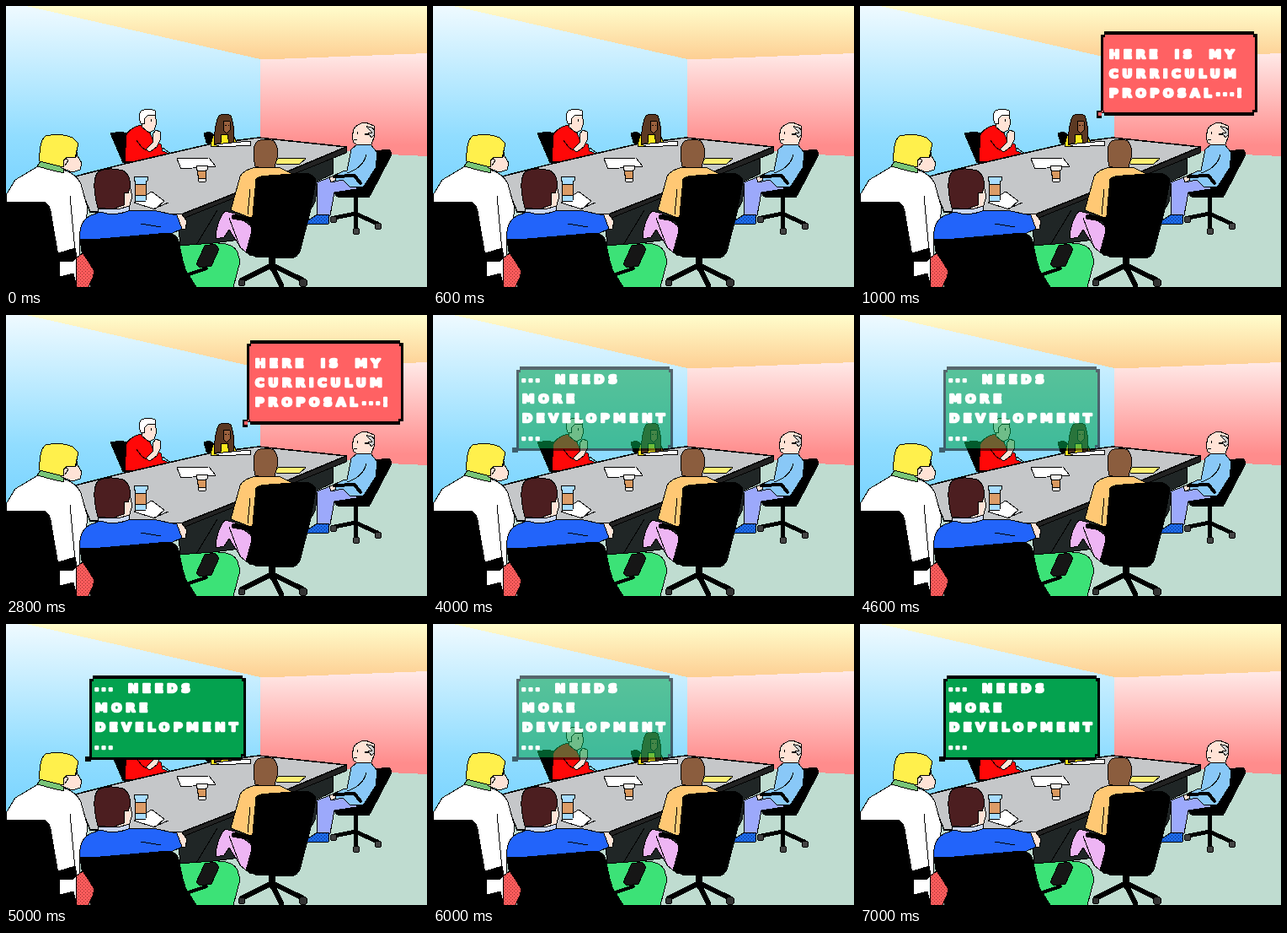
Animation, 500 px wide and 333 px high, one loop 8000 ms. Source, as an HTML page without scripts:

```html
<!DOCTYPE html>
<html lang="en">
<head>
<meta charset="utf-8">
<title>Meeting room</title>
<style>
  html, body { margin: 0; width: 100%; height: 100%; overflow: hidden; background: #bfdcd0; }
  svg { display: block; width: 100vw; height: 100vh; }
  .scene { stroke: #000; stroke-width: 1; stroke-linejoin: round; shape-rendering: crispEdges; }
  .bare { stroke: none; }
  .line { fill: none; }
  .limb { fill: none; stroke-linecap: round; }
  .skin { fill: #ffe3d6; }
  .box { shape-rendering: crispEdges; }
  text {
    font: bold 14.5px "DejaVu Sans", sans-serif;
    letter-spacing: 4.8px; word-spacing: 5.5px;
    fill: #fff; stroke: #fff; stroke-width: 2.6; stroke-linejoin: round;
  }
  .dots { letter-spacing: 2.8px; }
  .pitch { animation: pitch 8s step-end infinite; }
  .reply { animation: reply 8s step-end infinite; }
  .reply .box { animation: pulse 8s step-end infinite; }
  @keyframes pitch { 0%, 50% { visibility: hidden } 12.5% { visibility: visible } }
  @keyframes reply { 0% { visibility: hidden } 50% { visibility: visible } }
  @keyframes pulse { 0%, 50%, 75% { opacity: .57 } 62.5%, 87.5% { opacity: 1 } }
</style>
</head>
<body>
<svg viewBox="0 0 500 333" preserveAspectRatio="none">
  <defs>
    <linearGradient id="sky" gradientUnits="userSpaceOnUse" x1="0" y1="0" x2="0" y2="220">
      <stop stop-color="#effaff"/><stop offset=".7" stop-color="#91ddff"/><stop offset="1" stop-color="#7bd4ff"/>
    </linearGradient>
    <linearGradient id="ceiling" gradientUnits="userSpaceOnUse" x1="0" y1="0" x2="0" y2="64">
      <stop stop-color="#fffdcc"/><stop offset="1" stop-color="#fdce92"/>
    </linearGradient>
    <linearGradient id="rose" gradientUnits="userSpaceOnUse" x1="0" y1="58" x2="0" y2="165">
      <stop stop-color="#ffe8e6"/><stop offset="1" stop-color="#ff8c8c"/>
    </linearGradient>
    <pattern id="redDots" width="4" height="4" patternUnits="userSpaceOnUse">
      <path fill="#ff5c5c" d="M0 0h4v4H0z"/><path fill="#9c3030" d="M0 0h1v1H0zM2 2h1v1H2z"/>
    </pattern>
    <pattern id="blueDots" width="4" height="4" patternUnits="userSpaceOnUse">
      <path fill="#1c6ae8" d="M0 0h4v4H0z"/><path fill="#0a2c80" d="M0 0h1v1H0zM2 2h1v1H2z"/>
    </pattern>
  </defs>

  <g class="scene">
    <!-- Room -->
    <g class="bare">
      <path fill="#bfdcd0" d="M0 0H500V333H0z"/>
      <path fill="url(#sky)" d="M0 0H30L302 62V240H0z"/>
      <path fill="url(#ceiling)" d="M24 0H500V56L318 63 302 63z"/>
      <path fill="url(#rose)" d="M302 63H318L500 56V178L455 176 302 164z"/>
    </g>

    <!-- Man in red -->
    <path d="M124 151L137 149 147 152 150 184 139 186 133 172z"/>
    <path d="M140 184L186 176 185 197 142 196z"/>
    <path fill="#ff0808" d="M141 184L143 153Q146 145 160 141L170 148 175 160 184 164 186 172 199 177 181 180 163 187z"/>
    <path class="skin" d="M161 129H177L179 138 176 147 170 150 162 144z"/>
    <path fill="#fff" d="M160 139Q156 128 161 124 169 120 177 124L178 129 168 130 165 133 164 140z"/>
    <path class="skin" d="M174 152L178 147 183 149 184 157 179 167 171 173 166 170 174 162z"/>
    <path class="line" d="M155 159Q160 167 166 171M172 134v3M186 168L200 178"/>

    <!-- Table -->
    <path fill="#202626" d="M204 250L388 178V199L371 207 367 232 356 252 270 278 207 286z"/>
    <path fill="#222" d="M404 167V174L210 252 206 246z"/>
    <path fill="#c5c7c9" stroke-width="1.6" d="M82 202L141 187 245 163 300 156 404 167 262 226 208 247 100 244z"/>
    <path class="line" d="M388 183V199M251 242L226 283"/>

    <!-- Woman in yellow -->
    <path d="M235 151L242 149 248 154 247 164 238 162z"/>
    <path fill="#ffe81e" d="M243 164L246 154 258 149 270 153 274 162 264 166 244 167z"/>
    <path fill="#5c3922" d="M247 158Q249 136 253 130 260 126 267 130 271 139 271 161L265 163 263 152 256 152 255 162 248 164z"/>
    <path fill="#99603d" d="M259 136L266 137 266 147 262 151 258 147z"/>
    <path class="line" d="M260 141h2M264 141h1"/>

    <!-- Things on the table -->
    <g fill="#fff">
      <path d="M247 164L290 160 291 165 256 167z"/>
      <path d="M203 181L241 180 249 190 208 193z"/>
      <path d="M152 233L173 220 188 231 177 241z"/>
    </g>
    <path fill="#ffef72" d="M320 183L325 180 356 181 349 187 321 187z"/>
    <path class="line" d="M174 241L193 233"/>
    <path fill="#f6f2ec" d="M226 189H239V194H238L237 208H229L227 194H226z"/>
    <path fill="#d9985e" d="M227 195H238L237 204H229z"/>
    <path fill="#a8dcff" d="M152 202H168V207H167L166 231H154L153 207H152z"/>
    <path fill="#dc9c68" d="M153 211H167L166 224H154z"/>

    <!-- Man in light blue -->
    <path d="M440 172L453 170Q459 171 457 178L435 220 431 227 393 226 387 217 422 211z"/>
    <path fill="#9ca9fb" d="M369 209L385 203 421 210 416 217 390 221 385 248 370 248z"/>
    <path fill="url(#blueDots)" d="M356 256L368 248 384 247 383 258 357 259z"/>
    <path fill="#89c8f7" d="M405 195L410 170 417 164 433 164 441 174 439 192 424 215 408 214 400 206 386 209 385 203 402 195z"/>
    <path class="skin" d="M413 146Q417 139 427 138L437 142 438 153 434 164 418 165 413 162 411 155z"/>
    <path fill="#cfcfcf" d="M428 143Q438 142 438 152L434 156 432 153 426 152 435 150z"/>
    <path class="line" d="M417 149v3M413 158h4M428 176Q424 192 405 198"/>
    <path class="skin" d="M384 203L390 201 392 206 386 209z"/>
    <path class="limb" stroke-width="4" d="M390 202L414 201 421 210"/>
    <path class="limb" stroke-width="5" d="M415 226V250M390 251L415 246 441 258M415 248V263"/>
    <g fill="#444"><circle cx="389" cy="253" r="4"/><circle cx="416" cy="267" r="4"/><circle cx="442" cy="261" r="4"/></g>

    <!-- Man in tan -->
    <path fill="#eeb5f4" d="M249 276Q250 254 260 243L272 246 291 261V296L279 287 265 265 259 274z"/>
    <path fill="#ffc874" d="M267 242L278 202Q282 194 297 191L324 191 340 199 332 235 300 262 288 250z"/>
    <path class="line" d="M290 217L287 247M265 251L278 286"/>
    <path fill="#8b5d3e" d="M295 185Q292 165 299 160 309 156 318 160 324 166 322 180L319 191 303 192 296 190z"/>
    <path d="M297 205Q302 201 312 201L354 198Q367 199 368 208L361 245 350 288Q347 299 337 299L296 297 285 292 291 270z"/>
    <path class="limb" stroke-width="6" d="M271 250L290 253 297 270"/>
    <path class="limb" stroke-width="8" d="M316 298V310"/>
    <path class="limb" stroke-width="6" d="M280 325L316 307 351 324M316 309L327 331"/>
    <g fill="#333"><circle cx="280" cy="328" r="4"/><circle cx="353" cy="328" r="5"/></g>

    <!-- Man in white -->
    <path fill="#fff" d="M0 224L11 206 38 190 68 194Q84 199 89 211L97 240 94 260 88 268 86 333H0z"/>
    <path class="line" d="M76 225L82 290"/>
    <path fill="#78c478" d="M37 190L41 184 68 190 69 198 56 195z"/>
    <path class="skin" d="M66 166L82 164 85 178 90 186 88 194 79 197 66 192 58 183z"/>
    <path fill="#fff04c" d="M40 184Q39 160 47 154 65 150 79 156L86 163 82 180 72 179 68 184 68 191z"/>
    <path class="line" d="M68 184Q70 178 74 183L70 189M83 176v3"/>
    <path d="M0 232L43 232Q51 233 53 243L63 302V333H0z"/>
    <path d="M62 293L82 287 84 297 80 302 64 303z"/>
    <path d="M64 321L80 317 84 333H64z"/>
    <path fill="url(#redDots)" d="M83 299L92 292 106 315 98 333H83z"/>

    <!-- Man in blue -->
    <path fill="#3ce277" d="M204 284L246 281Q270 280 275 292L278 303 270 333H220z"/>
    <path class="skin" d="M115 231L146 208 150 226 146 239 136 246 112 246z"/>
    <path fill="#c9d6f2" d="M109 240L132 241 147 237 146 245 130 248 111 247z"/>
    <path fill="#4c1e20" d="M107 231Q102 206 109 197 121 190 139 195 149 201 147 216L145 222 141 221 140 236 126 241 109 239z"/>
    <path class="skin" d="M198 248L208 246 215 255 213 264 202 266z"/>
    <path fill="#2264fa" d="M88 276Q86 255 101 248L112 244Q128 250 148 242L174 242 203 248 209 264 196 270 103 279z"/>
    <path class="line" d="M160 258L184 262"/>
    <path d="M88 276L101 277 193 269Q203 270 205 279L212 311 226 333H100L105 314 90 291z"/>
    <path class="limb" stroke-width="4" d="M214 319L238 311"/>
    <path fill="#161616" d="M226 306L236 284 248 282 253 288 244 308 230 310z"/>
  </g>

  <g class="pitch">
    <g class="box">
      <path d="M290 30H468V33H472V126H468V130H290V127H287V133H281V124H286V34H290z"/>
      <path fill="#ff6163" d="M291 34H467V37H469V123H466V126H290V124H287V130H283V126H289V37H291z"/>
    </g>
    <text x="296" y="61.5">HERE IS MY</text>
    <text x="296" y="84.5">CURRICULUM</text>
    <text x="296" y="107.5">PROPOSAL<tspan class="dots" dy="-2">...</tspan><tspan dy="2">!</tspan></text>
  </g>

  <g class="reply">
    <g class="box">
      <path d="M103 61H281V64H285V157H281V161H101V163H94V157H99V65H103z"/>
      <path fill="#04a24f" d="M104 65H280V68H282V154H279V158H102V68H104z"/>
    </g>
    <text x="105" y="80.5"><tspan class="dots" dy="-2">...</tspan><tspan x="145" dy="2">NEEDS</tspan></text>
    <text x="106" y="103.5">MORE</text>
    <text x="106" y="126.5">DEVELOPMENT</text>
    <text x="105" y="147.5" class="dots">...</text>
  </g>
</svg>
</body>
</html>
```
